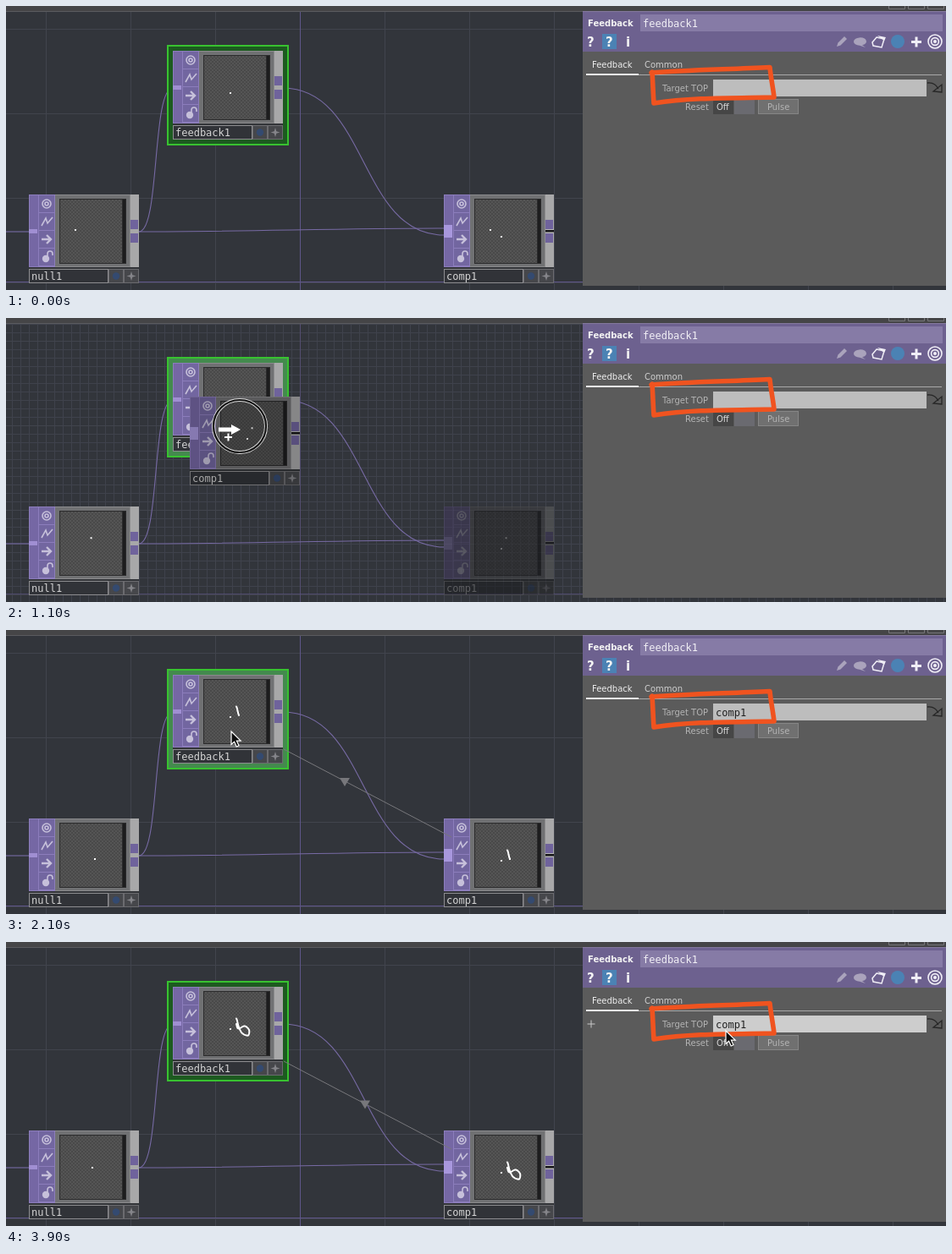
Animation of 1110 by 336 pixels, one loop 4 s. Source, as an HTML page:

```html
<!DOCTYPE html>
<html lang="en">
<head>
<meta charset="utf-8">
<title>Feedback node</title>
<style>
html, body { margin: 0; width: 100%; height: 100%; overflow: hidden; background: #32353b; }
svg { display: block; }
text { font: 10px "DejaVu Sans", sans-serif; fill: #b4b4b4; }
.mono { font: 12px "DejaVu Sans Mono", monospace; fill: #d4d4d4; }
.bold { font-weight: bold; fill: #f4f4f4; }
.big { font-size: 15px; }
.wire { fill: none; stroke: #776aa4; stroke-width: 1.1; }
.trace { fill: none; stroke: #fff; stroke-width: 2; stroke-linejoin: round; stroke-linecap: round; }
</style>
</head>
<body>
<svg id="stage" width="1110" height="336" viewBox="0 0 1110 336"></svg>
<script>
const STEP = 100, LOOP = 4000, DRAG = 800, DROP = 1400;
const stage = document.getElementById('stage');

const rect = (x, y, w, h, fill, more = '') =>
  `<rect x="${x}" y="${y}" width="${w}" height="${h}" fill="${fill}" ${more}/>`;
const path = (d, more) => `<path d="${d}" ${more}/>`;
const line = (d, color, w = 1) => path(d, `fill="none" stroke="${color}" stroke-width="${w}"`);
const label = (x, y, s, cls = '', more = '') => `<text x="${x}" y="${y}" class="${cls}" ${more}>${s}</text>`;

function grid(gap, color) {
  let d = '';
  for (let x = 47 % gap; x < 1110; x += gap) d += `M${x + .5} 6V336`;
  for (let y = 27 % gap; y < 336; y += gap) d += `M0 ${y + .5}H1110`;
  return line(d, color);
}

function buttons() {
  const ink = '#c6c0da';
  const box = [1, 22, 43, 64].map(y => rect(12, y, 18, 20, '#7266a0')).join('');
  return box +
    `<g fill="none" stroke="${ink}" stroke-width="1.6">
      <circle cx="21" cy="11" r="5"/><circle cx="21" cy="11" r="2"/>
      <path d="M15 37L20 28L22 34L28 27"/>
      <path d="M15 53H25M21 48L26 53L21 58" stroke-width="2.4"/>
      <path d="M22 73V70a3 3 0 0 1 6 0V72"/>
    </g><circle cx="20" cy="76" r="4.2" fill="${ink}"/>`;
}

// Node body, its own origin at the top left corner.
function node(name, inputs, inner) {
  const port = inputs > 1 ? rect(0, 36, 10, 15, '#a897dd') : rect(0, 41, 10, 5, '#a08fd2');
  return rect(0, 0, 130, 86, '#8b8b8d') +
    rect(0, 0, 31, 86, '#8c7dbc') + rect(1, 1, 10, 84, '#7567a4') + buttons() +
    rect(31, 1, 88, 84, '#707173') +
    rect(36, 5, 79, 77, '#2b2b2c') + rect(37, 6, 73, 75, 'url(#check)') + rect(111, 6, 3, 75, '#1d1d1e') +
    rect(120, 0, 10, 86, '#a8a8a9') + rect(120, 30, 9, 11, '#6f639c') + rect(120, 46, 9, 11, '#6f639c') +
    (inputs > 1 ? rect(120, 41, 10, 5, '#b8b8b8') + rect(120, 42, 10, 2.5, '#161618') : '') +
    port + rect(0, 86, 130, 2, '#323438') +
    rect(.5, 88.5, 93, 16, '#313338', 'stroke="#8d8d90"') +
    rect(94.5, 88.5, 17, 16, '#46474b', 'stroke="#6b6b6f"') +
    rect(112.5, 88.5, 17, 16, '#46474b', 'stroke="#6b6b6f"') +
    '<circle cx="103" cy="96.5" r="4.2" fill="#344a70"/>' +
    path('M121 91L122.3 95.2L126.5 96.5L122.3 97.8L121 102L119.7 97.8L115.5 96.5L119.7 95.2Z', 'fill="#85858a"') +
    label(3, 101, name, 'mono') + inner;
}

const dot = cls => `<rect class="${cls}" width="2" height="2" fill="#fff"/>`;
const still = rect(67, 49, 2, 2, '#fff');
const trace = '<path class="trace"/>';

function panel() {
  const white = '#f0eef6';
  return rect(681, 6, 429, 325, '#5b5b5b') + rect(681, 6, 429, 48, '#6d618f') +
    rect(681, 6, 429, 1, '#85799f') + rect(749, 10, 357, 20, '#867ba6') +
    label(687, 24, 'Feedback', 'bold') + label(752, 25, 'feedback1', 'mono', 'style="fill:#f2f0f6"') +
    label(686, 48, '?', 'bold big') +
    rect(704, 33, 17, 18, '#4b82b4') + label(708, 48, '?', 'bold big') +
    label(732, 48, 'i', 'bold big') +
    path('M981 48L982.5 43.5L990 36L993 39L985.5 46.5Z', 'fill="#aaa3bc"') +
    path('M1001 42a7.5 4.6 0 1 1 10 4.3L1015 49L1008 46.8A7.5 4.6 0 0 1 1001 42Z', 'fill="#aaa3bc"') +
    path('M1028 37L1037 39L1034 49L1024 47L1023 43Z', `fill="none" stroke="${white}" stroke-width="1.5"`) +
    path('M1029 35L1039 37L1037 41Z', `fill="${white}"`) +
    '<circle cx="1053" cy="42" r="8" fill="#4b82b4"/>' +
    line('M1069 42.5H1081M1075 36.5V48.5', white, 3) +
    `<g fill="none" stroke="${white}" stroke-width="1.6"><circle cx="1097" cy="42" r="8"/><circle cx="1097" cy="42" r="4.4"/></g>
     <circle cx="1097" cy="42" r="2" fill="${white}"/>` +
    label(692, 73, 'Feedback', '', 'style="fill:#eee"') + label(754, 73, 'Common', '', 'style="fill:#cfcfcf"') +
    rect(685, 81, 420, 1, '#a8a8a8') + rect(685, 80, 62, 2, '#f2f2f2') +
    label(775, 101, 'Target TOP') + rect(835, 87, 252, 20, '#bdbdbd', 'id="field"') +
    label(838, 102, 'comp1', 'mono', 'id="value" style="fill:#222"') +
    path('M1088 91C1095 90 1099 94 1101 98M1105 93V102L1095 101Z', 'fill="none" stroke="#262626" stroke-width="1.3"') +
    label(802, 123, 'Reset') +
    rect(835, 110, 24, 18, '#464646') + rect(860, 110, 24, 18, '#6a6a70') + label(839, 123, 'Off', '', 'style="fill:#d8d8d8"') +
    rect(888.5, 110.5, 47, 17, '#707070', 'stroke="#868686"') + label(899, 123, 'Pulse') +
    `<g id="expand">${line('M686.5 97H695.5M691 92.5V101.5', '#c8c8c8')}</g>` +
    path('M762 79C800 76 850 75 902 72.5C903 84 906 98 907 108C860 109 810 108 765 115C764 102 764 92 763 78',
      'fill="none" stroke="#f0531f" stroke-width="5.6" stroke-linejoin="round" stroke-linecap="round"');
}

stage.innerHTML = `<defs>
  <pattern id="check" width="4" height="4" patternUnits="userSpaceOnUse">
    ${rect(0, 0, 4, 4, '#494949')}${rect(0, 0, 2, 2, '#555')}${rect(2, 2, 2, 2, '#555')}
  </pattern>
  <g id="comp">${node('comp1', 2, still + dot('now') + trace)}</g>
</defs>` +
  rect(0, 0, 1110, 336, '#32353b') + `<g id="fine">${grid(10, '#3f424c')}</g>` + grid(100, '#41444d') +
  `<g id="axes">${line('M347.5 6V336M0 326.5H1110', '#5f5689')}</g>` +
  rect(0, 0, 1110, 6, '#454547') + rect(0, 6, 1110, 1, '#5a5b5f') +
  line('M1042.5 0V3.5H1061.5V0M1065.5 0V3.5H1084.5V0M1088.5 0V3.5H1107.5V0', '#77777a') +
  rect(509, 215, 146, 121, '#4e4e4f', 'id="glow"') +
  `<g class="wire"><path d="M0 267H27"/><path d="M157 267C182 267 172 97 197 97"/>
   <path d="M157 267C277 267 397 263 517 263"/><path d="M327 97C427 97 417 271 517 271"/></g>` +
  rect(191, 47, 142, 117, '#1d5a20', 'id="select" stroke="#38c230" stroke-width="2"') +
  `<g transform="translate(27 223)">${node('null1', 1, dot('now'))}</g>
   <g transform="translate(197 53)">${node('feedback1', 1, still + trace)}</g>
   <use id="base" href="#comp" x="517" y="223"/>
   <g id="link">${line('M328 141L526 245', '#77777b')}${path('M-6 -4H6L0 6Z', 'id="tip" fill="#77777b"')}</g>
   <g id="ghost"><use href="#comp"/></g>
   <g id="cross">${line('M-5 .5H5M.5 -5V5', '#e8e8e8')}</g>
   <g id="ring"><circle r="31" fill="none" stroke="#ddd" stroke-width="4"/><circle r="31" fill="none" stroke="#111" stroke-width="2.2"/>
     ${path('M-25 1.5H-10V-2L1 4L-10 10V6.5H-25Z', 'fill="#fff"')}
     <g id="plus">${line('M-18 13H-9M-13.5 8.5V17.5', '#fff', 2)}</g></g>` +
  panel() +
  `<g id="cursor">${path('M0 0V15.5L3.6 12.2L6.2 18L9 16.8L6.4 11.2H11.2Z', 'fill="#0c0c0c" stroke="#fff" stroke-width="1.2"')}</g>`;

const el = Object.fromEntries([...stage.querySelectorAll('[id]')].map(e => [e.id, e]));
const nows = stage.querySelectorAll('.now'), traces = stage.querySelectorAll('.trace');

// Keys are [time, x, y].
const spot = [[0, 82, 265], [300, 91, 262], [700, 98, 261], [900, 99, 261], [1300, 102, 260.5], [2100, 105, 271],
  [2450, 109, 278], [2800, 116, 280.5], [3050, 117, 274], [3300, 112, 269.5], [3600, 106, 272], [3750, 103.5, 272], [3900, 102, 267]];
const mouse = [[200, 632, 334], [500, 594, 276], [700, 592, 272], [1400, 266, 120], [2200, 266, 120],
  [2700, 630, 161], [2800, 635, 162], [3100, 680, 152], [3700, 848, 106], [3900, 850, 105]];
const ghost = [[800, 447, 193], [900, 327, 153], [1000, 257, 113], [1100, 217, 93], [1200, 187, 73]];
const ring = [[800, 490, 238], [900, 373, 193], [1000, 302, 148], [1100, 276, 128], [1200, 265, 122]];
const tip = [[1400, 400, 179], [2100, 400, 179], [2800, 438, 199], [3900, 424, 191.5]];

function at(keys, t, smooth) {
  const last = keys.length - 1;
  if (t <= keys[0][0]) return keys[0].slice(1);
  if (t >= keys[last][0]) return keys[last].slice(1);
  const i = keys.findIndex(k => k[0] > t) - 1;
  const a = keys[i], b = keys[i + 1], span = b[0] - a[0], u = (t - a[0]) / span;
  return [1, 2].map(c => {
    if (!smooth) return a[c] + (b[c] - a[c]) * u;
    const slope = j => {
      const p = keys[Math.max(j - 1, 0)], q = keys[Math.min(j + 1, last)];
      return (q[c] - p[c]) / (q[0] - p[0]) * span;
    };
    const v = u * u, w = v * u;
    return (2 * w - 3 * v + 1) * a[c] + (w - 2 * v + u) * slope(i) + (3 * v - 2 * w) * b[c] + (w - v) * slope(i + 1);
  });
}

const show = (e, on) => e.setAttribute('display', on ? 'inline' : 'none');
const move = (e, [x, y]) => e.setAttribute('transform', `translate(${x} ${y})`);
const local = t => { const [x, y] = at(spot, t, true); return [x - 27, y - 223]; };
const inside = ([x, y], l, t, r, b) => x > l && x < r && y > t && y < b;

function draw(t) {
  const drag = t >= DRAG && t < DROP, linked = t >= DROP, over = drag && t >= 1100;
  const p = at(mouse, t), seen = t >= 200 && !drag;
  const [nx, ny] = local(t);
  nows.forEach(e => move(e, [nx - 1, ny - 1]));

  let d = '';
  if (linked) for (let s = 1300; s <= t; s += 50) d += (d ? 'L' : 'M') + local(s).map(v => v.toFixed(1)).join(' ');
  traces.forEach(e => e.setAttribute('d', d));

  show(el.fine, drag);
  el.axes.setAttribute('opacity', drag ? .6 : 1);
  el.base.style.filter = drag ? 'brightness(.55) opacity(.6)' : 'none';
  show(el.ghost, drag);
  show(el.ring, drag);
  show(el.plus, over);
  show(el.cross, drag && !over);
  const [gx, gy] = at(ghost, t);
  move(el.ghost, [gx, gy]);
  move(el.cross, [gx, gy + 105]);
  move(el.ring, at(ring, t));
  el.ghost.style.filter = over ? 'brightness(.8)' : 'none';

  show(el.glow, seen && inside(p, 509, 215, 655, 336));
  el.select.setAttribute('fill', over || seen && inside(p, 190, 46, 334, 165) ? '#448a4e' : '#1d5a20');
  show(el.link, linked);
  show(el.value, linked);
  move(el.tip, at(tip, t));
  show(el.cursor, seen);
  move(el.cursor, p);
  const row = seen && inside(p, 681, 86, 1110, 108);
  show(el.expand, row);
  el.field.setAttribute('fill', row ? '#cdcdcd' : '#bdbdbd');
}

const start = performance.now();
function tick() {
  const t = (performance.now() - start) % LOOP;
  draw(Math.floor(t / STEP) * STEP);
  requestAnimationFrame(tick);
}
tick();
</script>
</body>
</html>
```
